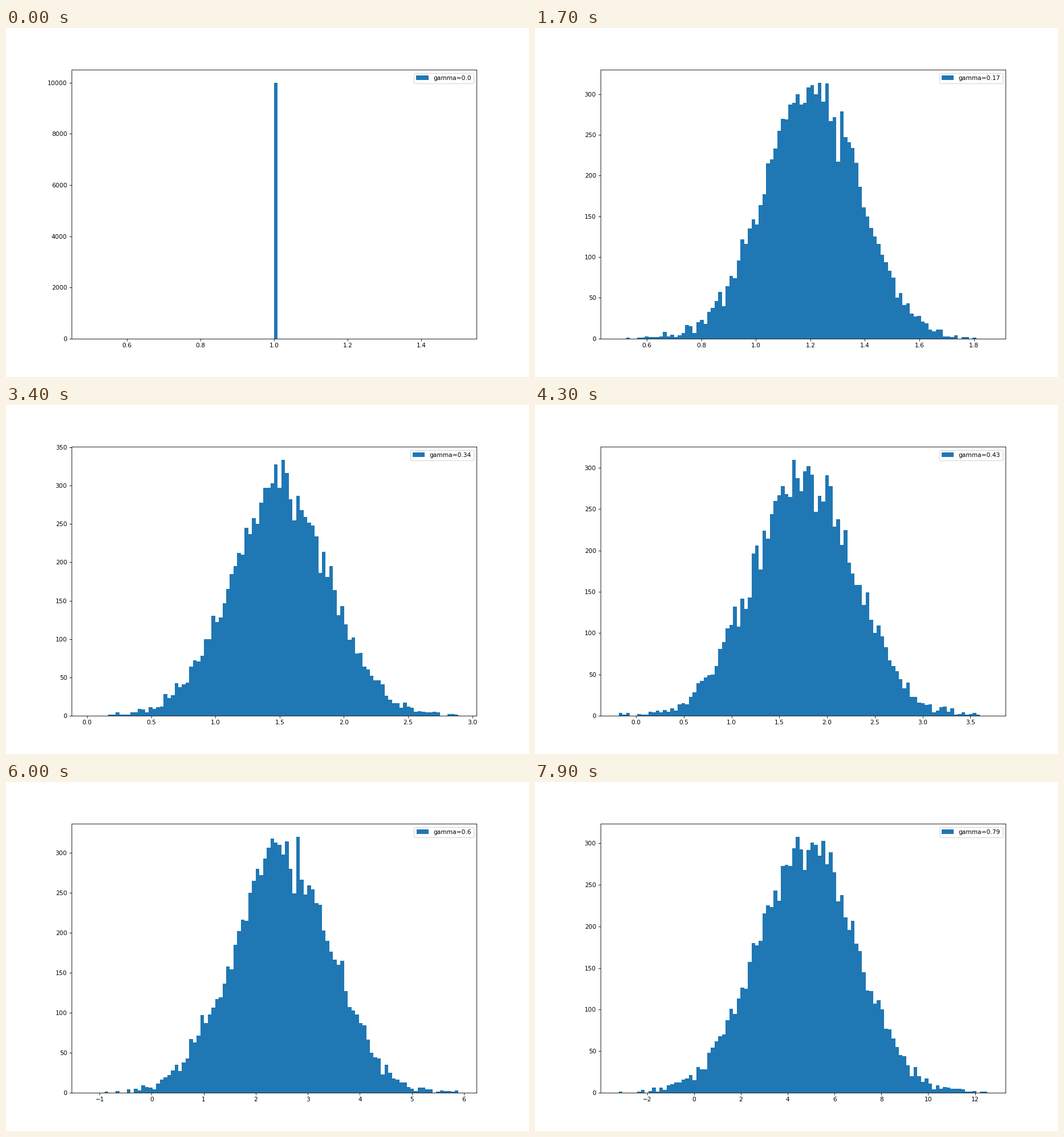
These frames come from a looping animation (917x611 px, 8000 ms). A matplotlib script:

```python
import numpy as np
import matplotlib.pyplot as plt
from matplotlib.animation import FuncAnimation

FRAMES, INTERVAL = 80, 100
SAMPLES, BINS = 10000, 100


def histogram(gamma, seed):
    """Counts of sum(gamma^t * r_t), with r_t normal, mean 1 and variance t."""
    rng = np.random.default_rng(seed)
    mean = 1 / (1 - gamma)
    sigma = gamma / (1 - gamma ** 2)
    returns = rng.normal(mean, sigma, SAMPLES)
    # typical reach of the lowest and highest sample, in sigmas
    below, above = rng.normal([3.85, 3.65], [0.15, 0.05])
    span = (mean - below * sigma, mean + above * sigma)
    return np.histogram(returns, BINS, range=span)


# 12 x 8 inches, the width rounded up so the canvas is 917 x 611 px
fig, ax = plt.subplots(figsize=(12.007, 8), dpi=611 / 8)


def draw(step):
    gamma = step / 100
    counts, edges = histogram(gamma, 500 + step)
    centres = (edges[:-1] + edges[1:]) / 2
    ax.clear()
    ax.hist(centres, edges, weights=counts, label=f"gamma={gamma}")
    ax.legend(loc="upper right")


anim = FuncAnimation(fig, draw, frames=FRAMES, interval=INTERVAL,
                     repeat=True, repeat_delay=0)
plt.show()
```
